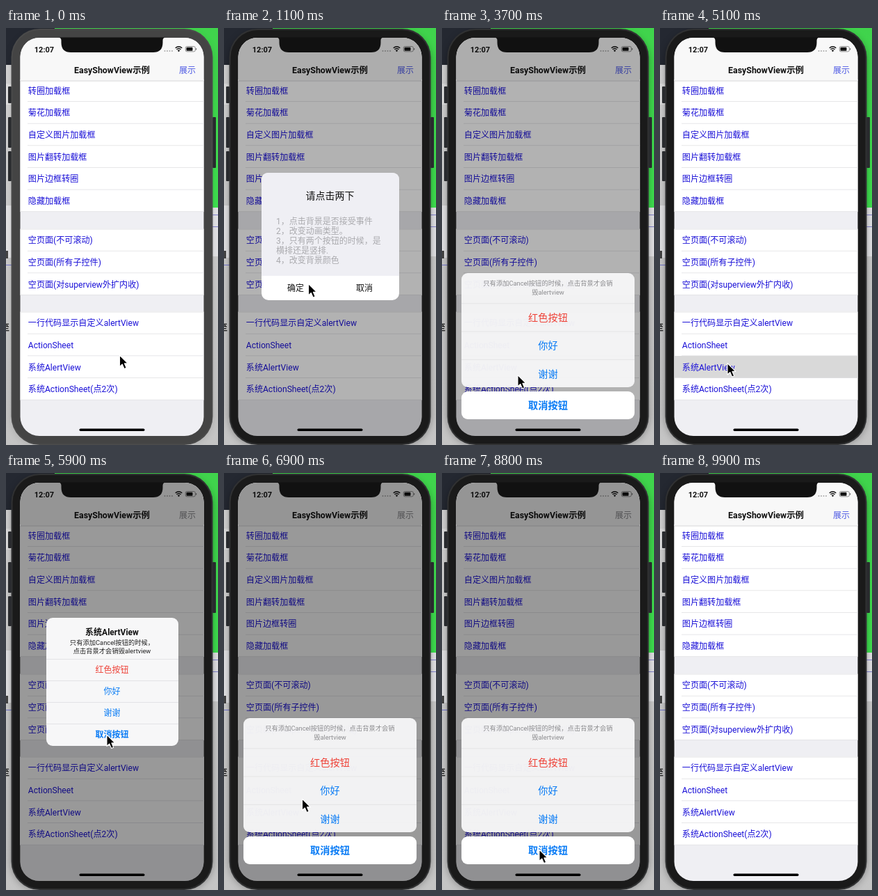
An HTML page that plays this animation: 305x599 px, repeating every 10 s.

```html
<!DOCTYPE html>
<html lang="zh-CN">
<head>
<meta charset="utf-8">
<title>EasyShowView示例</title>
<style>
html, body { margin: 0; width: 100%; height: 100%; overflow: hidden; background: #c9c9c9; }
svg { display: block; width: 100vw; height: 100vh; }
text { font-family: Roboto, "Noto Sans CJK SC", "Noto Sans CJK", "Noto Sans", sans-serif; }
</style>
</head>
<body>
<svg id="stage" viewBox="0 0 305 599" preserveAspectRatio="none">
  <defs>
    <clipPath id="screenClip"><rect x="20.5" y="14" width="264" height="572" rx="27.5"/></clipPath>
    <linearGradient id="shade" x2="0" y2="1">
      <stop offset="0" stop-color="#d6d6d6"/><stop offset="1" stop-color="#c4c4c4"/>
    </linearGradient>
    <linearGradient id="green" x2="0" y2="1">
      <stop offset="0" stop-color="#40d34c"/><stop offset="1" stop-color="#3fe350"/>
    </linearGradient>
    <filter id="blur" x="-20%" y="-20%" width="140%" height="140%"><feGaussianBlur stdDeviation="6"/></filter>
  </defs>
  <g id="desktop"></g>
  <g id="phone"></g>
  <g clip-path="url(#screenClip)">
    <g id="page"></g>
    <rect id="dim" x="20" y="14" width="265" height="572"/>
    <g id="popups"></g>
    <rect x="105.5" y="575.5" width="94" height="3.5" rx="1.7"/>
  </g>
  <path d="M75 13.5q4.5 0 4.5 4.5v3q0 14 14 14H211.500q14 0 14-14v-3q0-4.500 4.500-4.500z" fill="#111"/>
  <circle id="ring" r="24.5" fill="none" stroke="#111" stroke-width="1.7"/>
  <path id="cursor" d="M0 0V16.5L3.8 13L6.7 19.6L9.7 18.3L6.9 11.9H11.8Z" stroke="#fff" stroke-width="1.1" stroke-linejoin="round"/>
</svg>
<script>
const LOOP = 10000, STEP = 100, ROW = 31.65, WINDOW_ACTIVE = 400;
const BLUE = "#1c12d8", TINT = "#087bf5", RED = "#ee4238";
const $ = id => document.getElementById(id);

function add(parent, tag, attrs = {}, content = "") {
  const node = document.createElementNS("http://www.w3.org/2000/svg", tag);
  for (const key in attrs) node.setAttribute(key, attrs[key]);
  node.textContent = content;
  return parent.appendChild(node);
}
const rect = (p, x, y, width, height, fill, rx = 0) =>
  add(p, "rect", { x, y, width, height, fill, rx });
const label = (p, content, x, y, size, fill, anchor = "middle", weight = 400) =>
  add(p, "text", { x, y: y + size * .37, "font-size": size, fill,
    "text-anchor": anchor, "font-weight": weight }, content);
const line = (p, x, y, width, fill = "#dcdcdf") => rect(p, x, y, width, .7, fill);

function drawDesktop(g) {
  rect(g, 0, 0, 305, 599, "url(#shade)");
  rect(g, 0, 0, 70, 53, "#242831");
  rect(g, 0, 80, 8, 30, "#e2e2e2");
  rect(g, 70, 0, 235, 258, "url(#green)");
  rect(g, 0, 255, 9, 75, "#e6e6e8");
  rect(g, 0, 320, 3, 11, "#444");
  line(g, 0, 340, 9, "#4b51cf");
  label(g, "至", -7, 431, 12, "#222", "start", 700);
  rect(g, 296, 258, 9, 70, "#e5e5e8");
  [268, 285].forEach(y => line(g, 296, y, 9, "#5a58c8"));
}

let shadow, rim, bezel;

function drawPhone(g) {
  shadow = rect(g, 7.5, 6, 290, 593, "#000", 42);
  shadow.setAttribute("filter", "url(#blur)");
  [[3, 84, 24], [3, 128, 44], [3, 177, 43], [297, 128, 73]]
    .forEach(([x, y, h]) => rect(g, x, y, 5, h, "#292b2e", 1));
  rim = rect(g, 7.5, 1, 290, 598, "#303132", 41);
  bezel = rect(g, 9.5, 3, 286, 594, "#1a1a1a", 39);
}

const sections = [
  [74, ["转圈加载框", "菊花加载框", "自定义图片加载框", "图片翻转加载框", "图片边框转圈", "隐藏加载框"]],
  [288.7, ["空页面(不可滚动)", "空页面(所有子控件)", "空页面(对superview外扩内收)"]],
  [407.7, ["一行代码显示自定义alertView", "ActionSheet", "系统AlertView", "系统ActionSheet(点2次)"]]
];
const rowFills = {};
let navButton;

function drawPage(g) {
  rect(g, 20, 14, 265, 572, "#efeff3");
  for (const [top, names] of sections) {
    rect(g, 20, top, 265, ROW * names.length, "#fff");
    line(g, 20, top, 265);
    names.forEach((name, i) => {
      const y = top + i * ROW, last = i === names.length - 1;
      rowFills[name] = rect(g, 20, y, 265, ROW, "#d9d9d9");
      label(g, name, 31.8, y + ROW / 2 + .3, 12.1, BLUE, "start");
      line(g, last ? 20 : 31, y + ROW - .5, last ? 265 : 254);
    });
  }
  rect(g, 20, 14, 265, 62, "#f8f8f8");
  line(g, 20, 75.7, 265, "#c8c8ca");
  label(g, "EasyShowView示例", 152.5, 60.5, 12.4, "#111", "middle", 600);
  navButton = label(g, "展示", 261, 60.5, 12, "#4d59e4");
  label(g, "12:07", 55, 30.5, 11, "#111", "middle", 600);
  for (let i = 0; i < 4; i++) add(g, "circle", { cx: 228.5 + i * 3.5, cy: 33, r: 1, fill: "#aaa" });
  add(g, "path", { d: "M243.7 28.8Q248.5 24.6 253.3 28.8M245.4 30.8Q248.5 28.2 251.6 30.8",
    fill: "none", stroke: "#111", "stroke-width": 1.5 });
  add(g, "path", { d: "M246.7 32.2Q248.5 30.9 250.3 32.2L248.5 34.2Z", fill: "#111" });
  add(g, "rect", { x: 258.3, y: 26.5, width: 14, height: 7.4, rx: 2, fill: "none", stroke: "#777", "stroke-width": .8 });
  rect(g, 259.5, 27.7, 9, 5, "#111", 1);
  rect(g, 273, 29, 1.2, 2.6, "#777", .6);
}

const hints = ["1，点击背景是否接受事件", "2，改变动画类型。", "3，只有两个按钮的时候，是", "横排还是竖排.", "4，改变背景颜色"];

function drawAlert(vertical) {
  const g = add($("popups"), "g");
  const top = vertical ? 190.5 : 208, height = vertical ? 217 : 183, split = top + 148;
  rect(g, 54, top, 198, height, "#fff", vertical ? 12 : 10);
  add(g, "path", { d: `M54 ${split}V${top + 10}q0-10 10-10H242q10 0 10 10V${split}z`,
    fill: vertical ? "#00fbff" : "#efeff4" });
  label(g, "请点击两下", 152.5, top + 32.5, 14, "#111", "middle", 500);
  hints.forEach((hint, i) => label(g, hint, 75, top + 70 + i * 14, 12, vertical ? "#7fbcbe" : "#aaaaae", "start"));
  if (vertical) line(g, 54, split + 34.5, 198);
  label(g, "确定", vertical ? 153 : 103, split + 18, 12, "#111");
  label(g, "取消", vertical ? 153 : 202, split + (vertical ? 52 : 18), 12, "#111");
  return g;
}

const notice = ["只有添加Cancel按钮的时候，点击背景才会销", "毁alertview"];
const choices = [["红色按钮", RED], ["你好", TINT], ["谢谢", TINT]];

function drawSheet() {
  const g = add($("popups"), "g");
  add(g, "rect", { x: 28, y: 352, width: 249, height: 164, rx: 9, fill: "#f5f5f6", opacity: .97 });
  notice.forEach((s, i) => label(g, s, 152.5, 367 + i * 13, 9.3, "#8c8c8f"));
  choices.forEach(([s, color], i) => {
    line(g, 28, 395.5 + i * 40.2, 249, "#dededf");
    label(g, s, 152.5, 416 + i * 40.2, 14.2, color);
  });
  rect(g, 28, 522, 249, 40, "#fff", 9);
  label(g, "取消按钮", 152.5, 542, 14.2, TINT, "middle", 600);
  return g;
}

function drawSystemAlert() {
  const g = add($("popups"), "g");
  rect(g, 58, 208, 190, 184, "#f7f7f8", 9);
  label(g, "系统AlertView", 152.5, 229, 12, "#111", "middle", 600);
  ["只有添加Cancel按钮的时候，", "点击背景才会销毁alertview"].forEach((s, i) => label(g, s, 152.5, 244 + i * 12, 9.3, "#222"));
  [...choices, ["取消按钮", TINT]].forEach(([s, color], i) => {
    line(g, 58, 267 + i * 31, 190);
    label(g, s, 152.5, 283 + i * 31, 12, color, "middle", i === 3 ? 600 : 400);
  });
  return g;
}

drawDesktop($("desktop"));
drawPhone($("phone"));
drawPage($("page"));

const zoom = (node, k) => node.setAttribute("transform", `translate(152.5 299) scale(${k}) translate(-152.5 -299)`);
const slide = (node, k) => node.setAttribute("transform", `translate(0 ${(1 - k) * 240})`);
const pop = (node, k) => { node.setAttribute("opacity", k); zoom(node, 1.15 - .15 * k); };
const sheet = drawSheet();
// start: opening begins, end: closing begins
const popups = [
  { node: drawAlert(false), start: 550, end: 1300, out: 372, move: zoom, dim: .3 },
  { node: drawAlert(true), start: 1750, end: 2400, out: 372, move: zoom, dim: .3 },
  { node: sheet, start: 3150, end: 4400, out: 250, move: slide, dim: .3 },
  { node: drawSystemAlert(), start: 5200, end: 6100, out: 250, move: pop, dim: .4, fade: true },
  { node: sheet, start: 6500, end: 7350, out: 250, move: slide, dim: .4, fade: true },
  { node: sheet, start: 7900, end: 9100, out: 300, move: slide, dim: .4, fade: true }
];

const cursorPath = [
  [0, 163.5, 470], [400, 145, 424], [650, 145, 424], [1100, 121.5, 367.5], [1300, 112, 373],
  [1600, 145, 424], [1850, 145, 424], [2300, 155, 388], [2600, 155, 388], [2950, 78, 456],
  [3300, 78, 456], [4100, 140, 541], [4500, 140, 541], [4900, 97, 481.5], [5250, 97, 481.5],
  [5900, 145, 376], [6150, 145, 376], [6400, 113, 521], [6600, 113, 521], [6900, 112.5, 468],
  [7250, 135, 541], [7450, 135, 541], [7700, 113.5, 521.5], [8100, 113.5, 521.5],
  [8700, 140, 541], [9250, 140, 541], [9600, 180, 599]
];
const presses = [
  [500, sections[2][1][0]], [1700, sections[2][1][0]], [3100, "ActionSheet"],
  [5050, "系统AlertView"], [6450, "系统ActionSheet(点2次)"], [7850, "系统ActionSheet(点2次)"]
];

const clamp = v => Math.max(0, Math.min(1, v));
const easeOut = v => 1 - (1 - v) ** 3;
const smooth = v => v * v * (3 - 2 * v);

function cursorAt(t) {
  const i = cursorPath.findIndex(p => p[0] > t);
  if (i < 0) return cursorPath.at(-1).slice(1);
  const [t0, x0, y0] = cursorPath[i - 1], [t1, x1, y1] = cursorPath[i];
  const k = smooth((t - t0) / (t1 - t0));
  return [x0 + (x1 - x0) * k, y0 + (y1 - y0) * k];
}

function render(t) {
  // The simulator window is greyed until the first click activates it.
  const active = t >= WINDOW_ACTIVE;
  shadow.setAttribute("opacity", active ? .35 : .15);
  rim.setAttribute("fill", active ? "#303132" : "#4a4a4a");
  bezel.setAttribute("fill", active ? "#1a1a1a" : "#444");

  let dim = 0, tinted = true;
  popups.forEach(p => p.node.setAttribute("display", "none"));
  for (const p of popups) {
    if (t < p.start || t >= p.end + p.out) continue;
    const k = easeOut(clamp((t - p.start) / 300)) * (1 - clamp((t - p.end) / p.out));
    p.node.removeAttribute("display");
    p.move(p.node, k);
    dim = p.dim * (p.fade ? k : 1);
    if (p.fade) tinted = false;
  }
  $("dim").setAttribute("opacity", dim);
  navButton.setAttribute("fill", tinted ? "#4d59e4" : "#858589");

  const pressed = presses.find(([at]) => t >= at && t < at + 150);
  for (const name in rowFills)
    rowFills[name].setAttribute("opacity", pressed && pressed[1] === name ? 1 : 0);

  const [x, y] = cursorAt(t);
  $("cursor").setAttribute("transform", `translate(${x} ${y})`);
  $("cursor").setAttribute("opacity", t < 9600 ? 1 : 0);
  $("ring").setAttribute("transform", `translate(${x} ${y + 1.5})`);
  $("ring").setAttribute("opacity", t >= 7750 && t < 7900 ? 1 : 0);
}

const begin = performance.now();
function frame() {
  const t = (performance.now() - begin) % LOOP;
  render(Math.floor(t / STEP) * STEP);
  requestAnimationFrame(frame);
}
frame();
</script>
</body>
</html>
```
